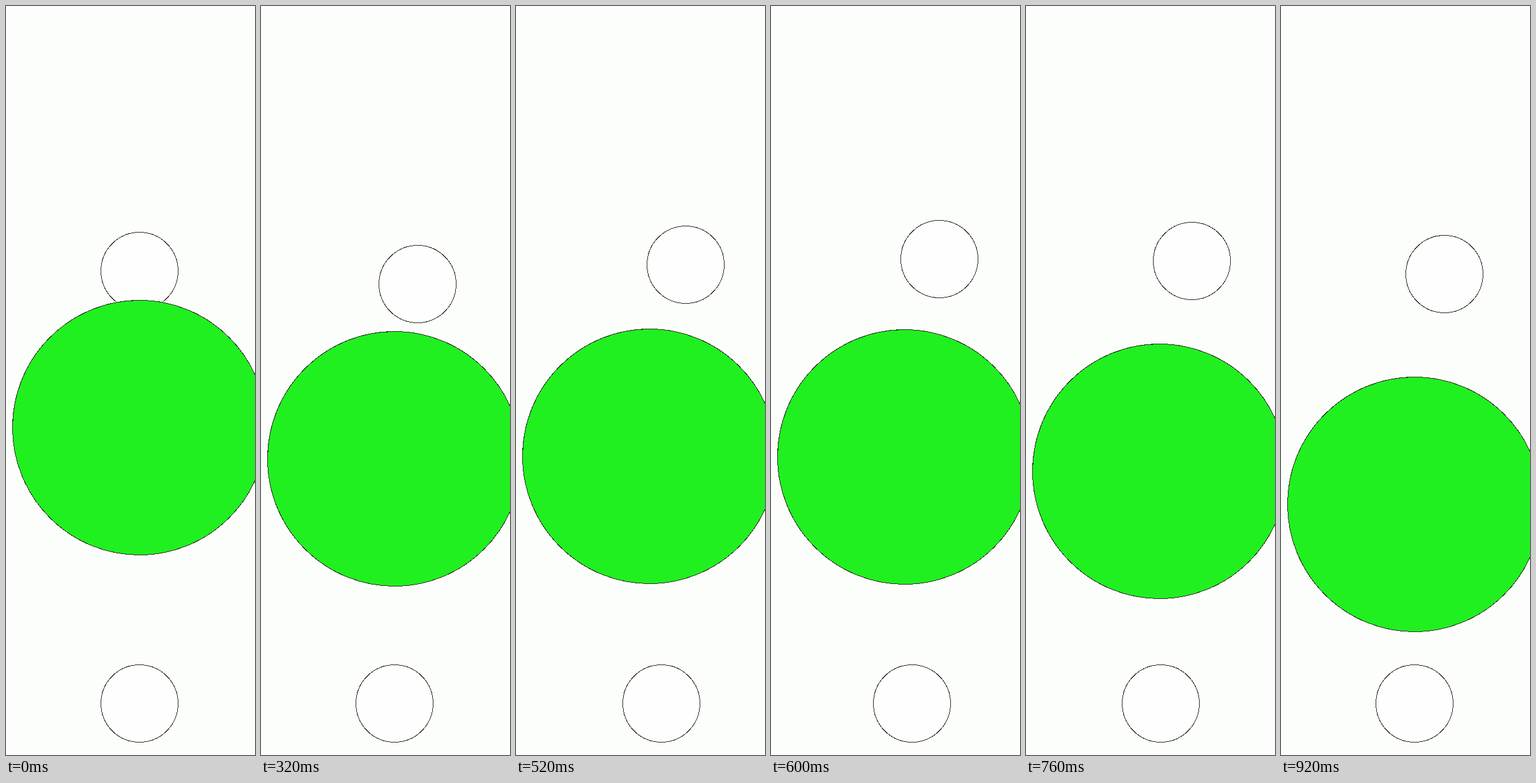
Recreate the animation shown at these times as an HTML page. Size 400 px wide and 1200 px high, loop 960 ms.

```html
<!DOCTYPE html>
<html lang="en">
<head>
<meta charset="utf-8">
<title>Drifting circles</title>
<style>
  html, body { margin: 0; width: 100%; height: 100%; overflow: hidden; background: #fcfefb; }
  svg { display: block; width: 100%; height: 100%; }
  circle { fill: #fdfefd; stroke: #2c2c22; shape-rendering: crispEdges; }
  #ball { fill: #20f020; }
</style>
</head>
<body>
<svg viewBox="0 0 400 1200">
  <circle id="upper" r="62"/>
  <circle id="lower" r="62"/>
  <circle id="ball" r="204"/>
</svg>
<script>
const LOOP = 960, STEP = 40;
const HIT = 320, DROP = 680, END = 920; // moments when the motion turns
const CENTER = 214;

const progress = (t, from, to) => Math.min(1, Math.max(0, (t - from) / (to - from)));
const ramp = (t, from, to, power = 1) => progress(t, from, to) ** power;
const hump = (t, from, to) => Math.sin(Math.PI * progress(t, from, to));
const smooth = u => u * u * (3 - 2 * u);

// Centres sit on half pixels so the thin outlines stay sharp.
function place(id, x, y) {
  const circle = document.getElementById(id);
  circle.setAttribute("cx", Math.round(x) + 0.5);
  circle.setAttribute("cy", Math.round(y) + 0.5);
}

function draw(time) {
  const t = Math.floor((time % LOOP) / STEP) * STEP;

  // Sinks, hovers, then falls faster.
  place("ball", CENTER, 675 + 50 * ramp(t, 0, HIT)
    - 4 * hump(t, HIT, DROP) + 73 * ramp(t, DROP, END, 1.2));

  // Dips, rises to a slowing peak and drops again while drifting right.
  place("upper",
    CENTER + 58 * smooth(progress(t, 0, 540)) - 10 * ramp(t, 520, END),
    424 + 21 * ramp(t, 0, HIT, 2.3)
      - 45 * (1 - ramp(t, DROP, HIT, 1.45)) + 29 * ramp(t, DROP, END, 1.2));

  // Sways to the right once per beat.
  place("lower", CENTER + 12 * hump(t, 0, HIT)
    + 19 * hump(t, HIT, DROP) + 2 * hump(t, DROP, END), 1117);
}

const start = performance.now();
function tick() {
  draw(performance.now() - start);
  requestAnimationFrame(tick);
}
tick();
</script>
</body>
</html>
```
